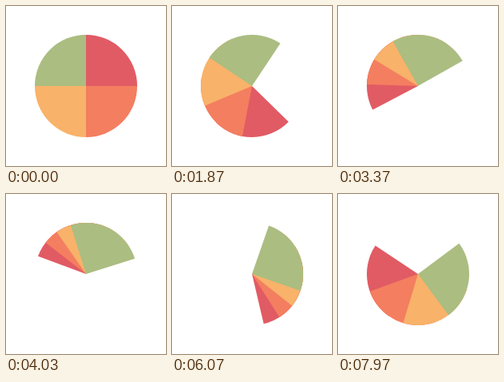
Animation, 200 px wide and 200 px high, one loop 8 s. Source, as an HTML page:

```html
<!DOCTYPE html>
<html lang="en">
<head>
<meta charset="utf-8">
<title>Wedges</title>
<style>
  html, body { margin: 0; width: 100%; height: 100%; overflow: hidden; background: #fff; }
  svg { display: block; width: 100%; height: 100%; }
</style>
</head>
<body>
<svg viewBox="0 0 200 200">
  <g id="pie" transform="translate(100 100)"></g>
</svg>
<script>
  const LOOP = 8000;
  const FPS = 30;
  const BASE_SPEED = 18; // degrees per second of the slowest wedge

  // Painted in order: the fastest wedge lies at the bottom.
  const wedges = [
    { color: '#e15b64', start: 0, factor: 4 },
    { color: '#f47e60', start: 90, factor: 3 },
    { color: '#f8b26a', start: 180, factor: 2 },
    { color: '#abbd81', start: 270, factor: 1 },
  ];

  const pie = document.getElementById('pie');
  for (const wedge of wedges) {
    wedge.path = document.createElementNS('http://www.w3.org/2000/svg', 'path');
    wedge.path.setAttribute('d', 'M0 0V-64A64 64 0 0 1 64 0Z');
    wedge.path.setAttribute('fill', wedge.color);
    pie.append(wedge.path);
  }

  // Steps fall on the 10 ms tick nearest to each 1/30 s.
  function stepTime(ms) {
    const tick = Math.floor(ms / 10) * 10;
    return Math.floor((tick + 5) * FPS / 1000) / FPS;
  }

  function draw(ms) {
    const turn = stepTime(ms % LOOP) * BASE_SPEED;
    for (const { path, start, factor } of wedges) {
      path.setAttribute('transform', `rotate(${start + turn * factor})`);
    }
  }

  const begin = performance.now();
  function tick() {
    draw(performance.now() - begin);
    requestAnimationFrame(tick);
  }
  tick();
</script>
</body>
</html>
```
